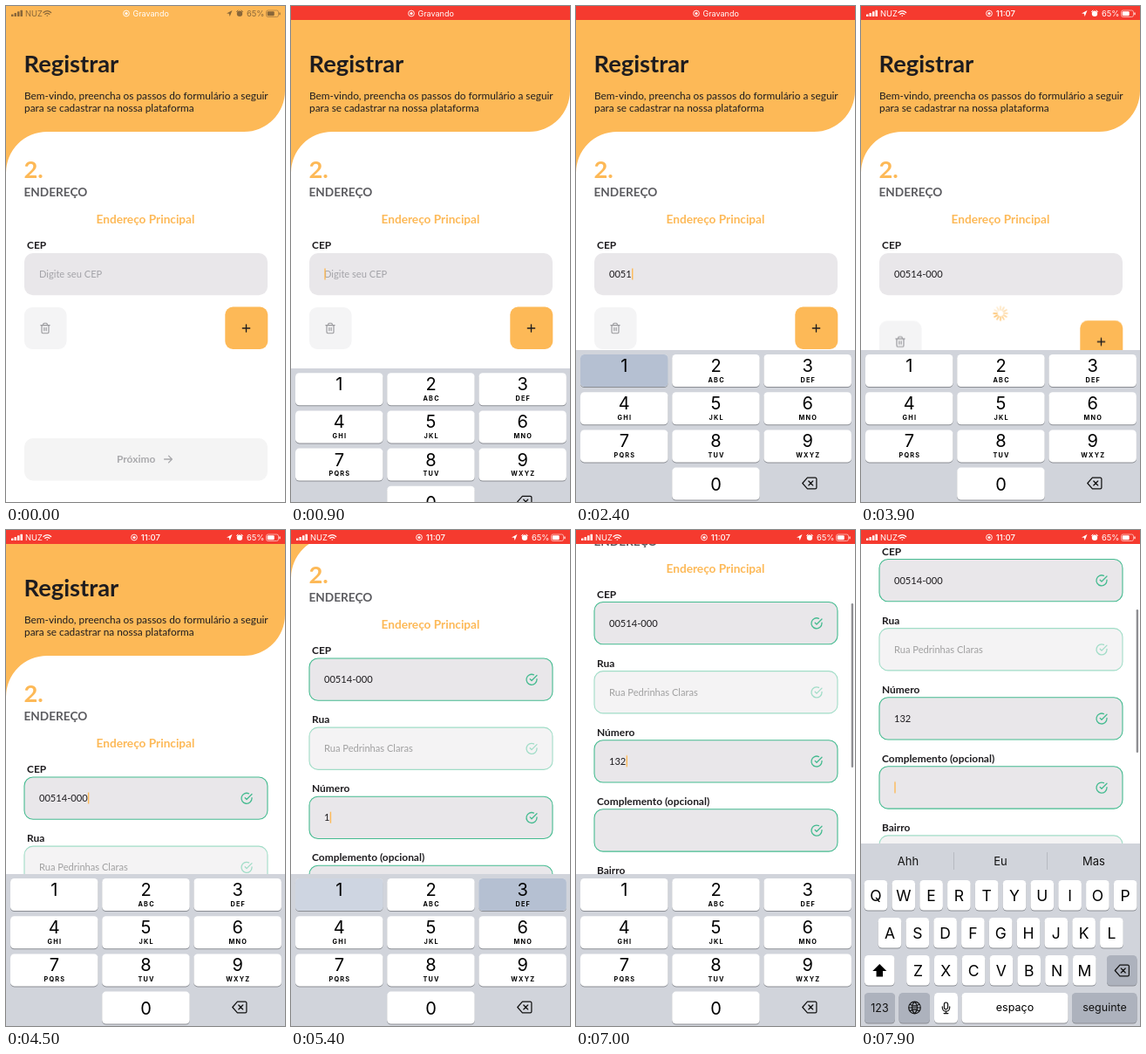
Animation of 320x568 px, one loop 8 s. Source, as an HTML page:

```html
<!DOCTYPE html>
<html lang="pt-BR">
<head>
<meta charset="utf-8">
<title>Registrar</title>
<style>
html, body { margin: 0; width: 100%; height: 100%; overflow: hidden; background: #fff; }
svg { display: block; width: 320px; height: 568px; font-family: Lato, "Open Sans", sans-serif; }
.ui { font-family: Inter, Roboto, sans-serif; }
.line { fill: none; stroke-linecap: round; stroke-linejoin: round; }
.b { font-weight: 700; }
.mid { text-anchor: middle; }

#scroll, #bar, #pad, #red, #before, #recording, #status { animation: 8s linear infinite; }
#tail, #spinner, .loaded, .typed, #pad, #qwerty { animation: 8s step-end infinite; }
#scroll { animation-name: scroll; }
#bar { animation-name: bar; }
#pad { animation: rise 8s linear infinite, leave 8s step-end infinite; }
#qwerty { animation-name: enter; }
#tail { animation-name: push; }
#spinner { animation-name: loading; }
#blades { transform-origin: 160px 352px; animation: spin 1s steps(12) infinite; }
.loaded { animation-name: loaded; }
.typed { animation-name: typed; }
#red { animation-name: redIn; }
#before { animation-name: fadeOut; }
#recording { animation-name: swapOut; }
#status { animation-name: swapIn; }

@keyframes scroll {
  0%, 58.1% { transform: translateY(0); animation-timing-function: ease-in-out; }
  61.9%, 78.1% { transform: translateY(-136px); animation-timing-function: ease-out; }
  86.5%, 92.6% { transform: translateY(-200.5px); animation-timing-function: ease-in-out; }
  96.2%, 100% { transform: translateY(-249.5px); }
}
@keyframes bar {
  0%, 78.1% { opacity: 0; y: 62px; height: 188px; }
  79.5% { opacity: 1; }
  86.5%, 92.6% { y: 84px; height: 188px; }
  96.2%, 100% { opacity: 1; y: 91px; height: 164px; }
}
@keyframes rise {
  0%, 9.4% { transform: translateY(176px); animation-timing-function: cubic-bezier(.2,.8,.3,1); }
  14%, 100% { transform: none; }
}
@keyframes leave { 0% { visibility: visible; } 93%, 100% { visibility: hidden; } }
@keyframes enter { 0% { visibility: hidden; } 93%, 100% { visibility: visible; } }
@keyframes push {
  0% { transform: none; }
  41.3% { transform: translateY(15.5px); }
  51.9%, 100% { transform: translateY(340px); }
}
@keyframes loading { 0% { visibility: hidden; } 41.3% { visibility: visible; } 51.9%, 100% { visibility: hidden; } }
@keyframes loaded { 0% { visibility: hidden; } 51.9%, 100% { visibility: visible; } }
@keyframes typed { 0% { visibility: hidden; } 66.25%, 100% { visibility: visible; } }
@keyframes spin { to { transform: rotate(360deg); } }
@keyframes redIn { 0% { opacity: 0; } 4%, 100% { opacity: 1; } }
@keyframes fadeOut { 0% { opacity: .6; } 3%, 100% { opacity: 0; } }
@keyframes swapOut { 0%, 35% { opacity: 1; } 37%, 100% { opacity: 0; } }
@keyframes swapIn { 0%, 35.5% { opacity: 0; } 37.5%, 100% { opacity: 1; } }
</style>
</head>
<body>
<svg id="stage" viewBox="0 0 320 568"></svg>
<script>
const ORANGE = '#fdb957', GREEN = '#45bb90', FIELD = '#e9e7ea', INK = '#1e1c1f';
const PITCH = 79.1;

const text = (x, y, size, fill, str, cls = '', extra = '') =>
  `<text x="${x}" y="${y}" font-size="${size}" fill="${fill}" class="${cls}" ${extra}>${str}</text>`;
const rect = (x, y, w, h, r, fill, extra = '') =>
  `<rect x="${x}" y="${y}" width="${w}" height="${h}" rx="${r}" fill="${fill}" ${extra}/>`;
// 24-unit line icon centred on a point
const icon = (cx, cy, scale, color, d, width = 2) =>
  `<path class="line" transform="translate(${cx} ${cy}) scale(${scale}) translate(-12 -12)" stroke="${color}" stroke-width="${width}" d="${d}"/>`;

const ICONS = {
  check: 'M22 11.1V12a10 10 0 1 1-5.9-9.1M22 4 12 14 9 11',
  trash: 'M3 6h18M19 6v14a2 2 0 0 1-2 2H7a2 2 0 0 1-2-2V6M8 6V4a2 2 0 0 1 2-2h4a2 2 0 0 1 2 2v2M10 11v6M14 11v6',
  plus: 'M12 4v16M4 12h16',
  arrow: 'M4 12h16M13 5l7 7-7 7',
  erase: 'M22 3H9L1 12l8 9h13a2 2 0 0 0 2-2V5a2 2 0 0 0-2-2zM18 8.5l-7 7M11 8.5l7 7',
  globe: 'M12 2a10 10 0 1 0 0 20a10 10 0 1 0 0-20M2 12h20M12 2c-6 6-6 14 0 20c6-6 6-14 0-20M4 6.500c5 3 11 3 16 0M4 17.500c5-3 11-3 16 0',
  mic: 'M12 2a3.500 3.500 0 0 0-3.500 3.500v6a3.500 3.500 0 0 0 7 0v-6A3.500 3.500 0 0 0 12 2zM5 10v2a7 7 0 0 0 14 0v-2M12 19v4M8 23h8'
};

function field(row, label, { id, value = '', hint = '', group = 'loaded', mark = 'loaded', off = false }) {
  const y = 283 + row * PITCH;
  return `<g class="${group}">${text(24, y - 5, 11.95, INK, label, 'b')}
    <g opacity="${off ? .5 : 1}">${rect(21, y, 279, 48.3, 10, FIELD)}
    ${text(38, y + 28, 11.1, '#a3a3a8', hint, '', id ? `id="${id}Hint"` : '')}
    ${text(38, y + 28, 11.1, off ? '#444' : INK, value, '', id ? `id="${id}"` : '')}
    <g class="${mark}">${rect(21, y, 279, 48.3, 10, 'none', `stroke="${GREEN}" stroke-width="1.1"`)}
    ${icon(276, y + 24.3, .6, GREEN, ICONS.check, 2.2)}</g></g></g>`;
}

const blades = Array.from({ length: 12 }, (_, i) =>
  `<path class="line" stroke="${ORANGE}" stroke-width="1.6" opacity="${.25 + i / 16}" transform="rotate(${i * 30} 160 352)" d="M160 348v-4"/>`).join('');

const content = `<g id="scroll">
  <path fill="${ORANGE}" d="M0 0H320V97A47 47 0 0 1 273 144H47A47 47 0 0 0 0 191Z"/>
  ${text(20.5, 76, 27.3, INK, 'Registrar', 'b')}
  ${text(21, 107, 11.85, INK, 'Bem-vindo, preencha os passos do formulário a seguir')}
  ${text(21, 121, 11.85, INK, 'para se cadastrar na nossa plataforma')}
  ${text(20.5, 197, 27.3, ORANGE, '2.', 'b')}
  ${text(20.5, 218, 13.65, '#5c5c60', 'ENDEREÇO', 'b')}
  ${text(160, 249, 13.65, ORANGE, 'Endereço Principal', 'b mid')}
  ${field(0, 'CEP', { id: 'cep', hint: 'Digite seu CEP', group: '' })}
  ${field(1, 'Rua', { value: 'Rua Pedrinhas Claras', off: true })}
  ${field(2, 'Número', { id: 'num', mark: 'typed' })}
  ${field(3, 'Complemento (opcional)', {})}
  ${field(4, 'Bairro', { off: true })}
  <g id="spinner"><g id="blades">${blades}</g></g>
  <g id="tail">
    ${rect(21, 345, 48.5, 48, 9, '#f4f4f5')}${icon(45, 369, .57, '#97979b', ICONS.trash)}
    ${rect(251.3, 344.500, 49, 48.500, 9, ORANGE)}${icon(275.5, 369, .52, INK, ICONS.plus, 2.6)}
    ${rect(21, 495, 279, 48.500, 10, '#f4f4f4')}
    ${text(127, 523, 11.95, '#a9a9ac', 'Próximo', 'b')}${icon(186, 519, .55, '#a9a9ac', ICONS.arrow, 2.4)}
  </g>
  <rect id="caret" width="1.4" height="13" fill="${ORANGE}"/>
</g>`;

const keycap = (x, y, w, h, fill = '#fff') =>
  rect(x, y + 1, w, h, 4.5, '#8b8e94') + rect(x, y, w, h, 4.5, fill);

function digitKey(d, letters, col, row) {
  const x = 5 + col * 105.2, y = 399 + row * 43.2, cx = x + 50.3;
  return keycap(x, y, 100.500, 37) + rect(x, y, 100.500, 37, 4.5, '#b5c0d2', `id="k${d}" opacity="0"`) +
    text(cx, y + (d ? 20 : 26), 20, '#000', d, 'mid') +
    text(cx + .6, y + 31.5, 7.3, '#000', letters, 'mid b', 'letter-spacing="1.25"');
}
const pads = ['', 'ABC', 'DEF', 'GHI', 'JKL', 'MNO', 'PQRS', 'TUV', 'WXYZ'];
const numPad = `<g id="pad" class="ui">${rect(0, 394, 320, 176, 0, '#d1d4db')}
  ${pads.map((s, i) => digitKey(i + 1, s, i % 3, Math.floor(i / 3))).join('')}
  ${digitKey(0, '', 1, 3)}${icon(267.500, 546.5, .7, '#111', ICONS.erase, 1.8)}</g>`;

const letterRow = (letters, first, y) => [...letters].map((c, i) => {
  const cx = first + i * 31.8;
  return keycap(cx - 13.3, y, 26.6, 34.5) + text(cx, y + 23.5, 17.5, '#000', c, 'mid');
}).join('');
const GRAY = '#adb2bd';
const words = [['Ahh', 54], ['Eu', 160], ['Mas', 267]].map(([w, x]) => text(x, 384, 13, '#111', w, 'mid')).join('');
const qwerty = `<g id="qwerty" class="ui">${rect(0, 359, 320, 209, 0, '#d1d4db')}${words}
  <path d="M106.500 369v20M213.500 369v20" stroke="#b7bac1" stroke-width="1"/>
  ${letterRow('QWERTYUIOP', 17, 401)}${letterRow('ASDFGHJKL', 33, 444)}${letterRow('ZXCVBNM', 65.5, 487)}
  ${keycap(4, 487, 34.5, 34.5)}<path d="M21.300 497l8 8h-4.300v6.500h-7.400v-6.500h-4.300z"/>
  ${keycap(282, 487, 34.5, 34.5, GRAY)}${icon(299, 504.5, .7, '#111', ICONS.erase, 1.8)}
  ${keycap(4, 530, 35, 34.5, GRAY)}${text(21.500, 551.5, 12.5, '#111', '123', 'mid')}
  ${keycap(43.5, 530, 35.5, 34.5, GRAY)}${icon(61.500, 547, .68, '#111', ICONS.globe, 1.7)}
  ${keycap(84, 530, 27, 34.5)}${icon(97.500, 547, .6, '#111', ICONS.mic, 2)}
  ${keycap(115.5, 530, 122, 34.5)}${text(176.500, 551, 12.5, '#000', 'espaço', 'mid')}
  ${keycap(242, 530, 74.5, 34.5, GRAY)}${text(279.500, 551, 12.5, '#111', 'seguinte', 'mid')}</g>`;

const recordDot = x =>
  `<circle cx="${x}" cy="8.500" r="3.400" fill="none" stroke="#fff" stroke-width=".9"/><circle cx="${x}" cy="8.500" r="1.600" fill="#fff"/>`;
const statusIcons = c => [0, 1, 2, 3].map(i => rect(6 + i * 3.500, 9.500 - i * 1.600, 2.5, 2.500 + i * 1.600, .5, c)).join('') +
  text(22, 12, 9.3, c, 'NUZ') +
  `<path class="line" stroke="${c}" stroke-width="1.300" d="M43 7.500q4.300-3.600 8.600 0M44.700 9.400q2.600-2 5.200 0M47.200 11.200h.2"/>
  <path fill="${c}" d="M253 8.600l6.500-3.600-2.800 7-.9-3.200z"/>
  <circle cx="268" cy="8.800" r="3.200" fill="${c}"/><path class="line" stroke="${c}" d="M264.500 6.500l1.500-1.500M271.500 6.500l-1.500-1.500"/>` +
  text(276, 12, 9.3, c, '65%') +
  rect(298.500, 5, 14, 7.500, 2, 'none', `stroke="${c}" stroke-width=".8" stroke-opacity=".7"`) +
  rect(299.7, 6.2, 8, 5.100, 1, c) + rect(313.4, 7.3, 1.2, 3, .6, c);

const statusBar = `<g class="ui">
  ${rect(0, 0, 320, 16, 0, ORANGE)}${rect(0, 0, 320, 16, 0, '#f53a2f', 'id="red"')}
  <g id="before">${statusIcons('#3a3025')}</g>
  <g id="recording">${recordDot(138)}${text(145.5, 11.800, 9, '#fff', 'Gravando')}</g>
  <g id="status">${statusIcons('#fff')}${recordDot(147)}${text(154.800, 12, 9.5, '#fff', '11:07', '', 'font-weight="500"')}</g></g>`;

const $ = id => document.getElementById(id);
$('stage').innerHTML = content +
  rect(315.7, 84, 2.4, 188, 1.2, '#8e8e92', 'id="bar"') + numPad + qwerty + statusBar;

// Moment each key goes down, per input
const presses = {
  cep: [[1680, 0], [1880, 0], [2080, 5], [2280, 1], [2560, 4], [2780, 0], [2950, 0], [3100, 0]],
  num: [[5200, 1], [5350, 3], [5560, 2]]
};
const all = [...presses.cep, ...presses.num];
const focus = [[800, 0, 'cep'], [4650, 2, 'num'], [7450, 3, '']];
const RELEASE = 100;

const entered = (id, t) => presses[id].filter(p => t >= p[0] + RELEASE).map(p => p[1]).join('');

function draw(now) {
  const t = now % 8000;
  const cep = entered('cep', t);
  $('cep').textContent = cep.length > 5 ? cep.slice(0, 5) + '-' + cep.slice(5) : cep;
  $('cepHint').style.display = cep ? 'none' : '';
  $('num').textContent = entered('num', t);

  for (let d = 0; d < 10; d++) {
    const age = Math.min(...all.filter(p => p[1] === d && t >= p[0]).map(p => t - p[0]));
    $('k' + d).setAttribute('opacity', Math.max(0, Math.min(1, (300 - age) / 150)));
  }

  const active = focus.filter(f => t >= f[0]).pop();
  const caret = $('caret');
  caret.style.display = 'none';
  if (active) {
    const [start, row, id] = active;
    const last = Math.max(start, ...(presses[id] || []).map(p => p[0] + RELEASE).filter(m => m <= t));
    if ((t - last) % 1000 < 550) {
      caret.style.display = '';
      caret.setAttribute('x', 38.3 + (id ? $(id).getComputedTextLength() : 0));
      caret.setAttribute('y', 300.5 + row * PITCH);
    }
  }
}

const begin = performance.now();
(function tick() {
  draw(performance.now() - begin);
  requestAnimationFrame(tick);
})();
</script>
</body>
</html>
```
